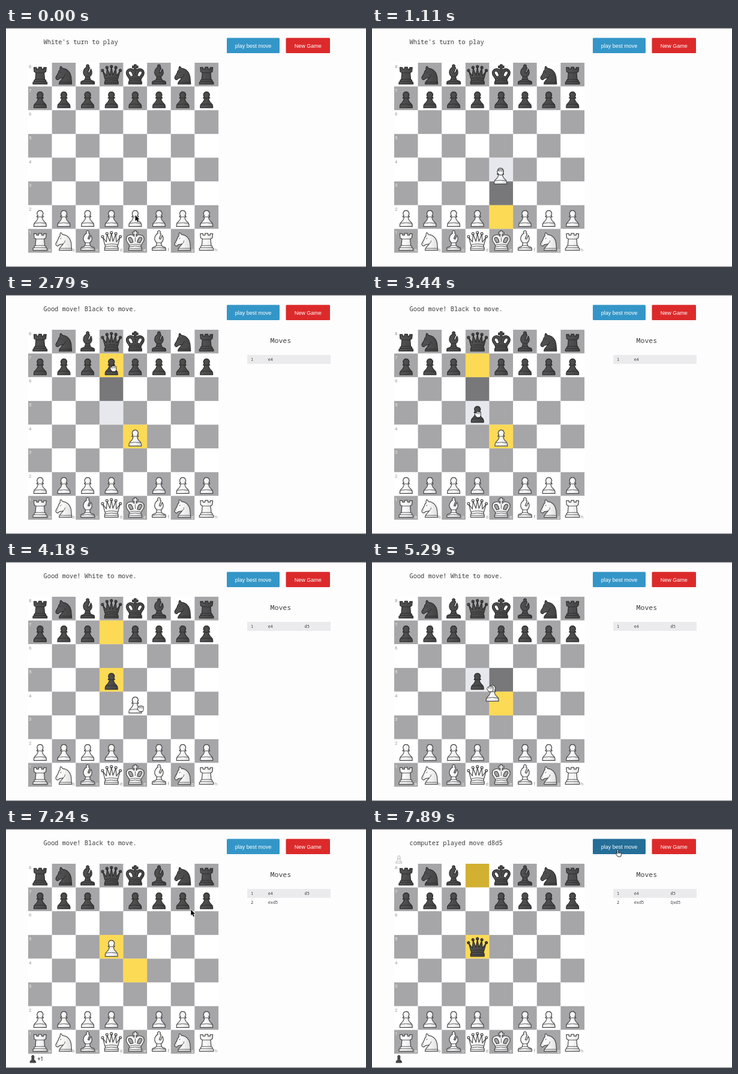
These frames come from a looping animation (600 by 399 pixels, 7990 ms). An HTML page:

```html
<!DOCTYPE html>
<html lang="en">
<head>
<meta charset="utf-8">
<title>Chess board</title>
<style>
html, body { margin: 0; width: 100%; height: 100%; overflow: hidden; background: #fefdfe; }
svg { display: block; width: 600px; height: 399px; }
.mono { font-family: "Noto Sans Mono", "DejaVu Sans Mono", monospace; fill: #3c3c3e; }
.coord { font: 7.8px Roboto, sans-serif; }
.btn { font: 9px "Liberation Sans", Arial, sans-serif; fill: #fff; text-anchor: middle; }
.w { fill: url(#ivory); stroke: #484848; }
.b { fill: url(#ebony); stroke: #2b2b2b; }
.w, .b { stroke-width: 1.2; stroke-linejoin: round; stroke-linecap: round; fill-rule: evenodd; }
.line { fill: none; stroke-width: .9; }
</style>
</head>
<body>
<svg id="stage" viewBox="0 0 600 399" xmlns="http://www.w3.org/2000/svg">
  <defs>
    <linearGradient id="ivory">
      <stop offset=".45" stop-color="#f9f9f9"/><stop offset="1" stop-color="#dedede"/>
    </linearGradient>
    <linearGradient id="ebony">
      <stop offset="0" stop-color="#555"/><stop offset="1" stop-color="#434343"/>
    </linearGradient>
  </defs>
  <rect width="600" height="399" fill="#fefdfe"/>
  <path d="M0 .5h600M0 398.5h600" stroke="#7d7d7f"/>
  <text id="status" class="mono" x="62.5" y="26.5" font-size="10.35"></text>
  <rect id="best" x="368" y="16.5" width="88" height="25.5" rx="1.5"/>
  <text class="btn" x="412" y="32.6">play best move</text>
  <rect x="466.5" y="16.5" width="73.5" height="25.5" rx="1.5" fill="#dc2a2b"/>
  <text class="btn" x="503.3" y="32.6">New Game</text>
  <g id="moves" class="mono" font-size="6.9">
    <text x="440.5" y="80" font-size="11.6">Moves</text>
    <rect x="402" y="100" width="139" height="15" fill="#ebeaec"/>
    <text x="408" y="110">1</text>
    <text x="436.7" y="110">e4</text>
    <text id="d5" x="497.5" y="110">d5</text>
    <g id="row2">
      <text x="408" y="125">2</text>
      <text x="436.7" y="125">exd5</text>
      <text id="qxd5" x="497.5" y="125">Qxd5</text>
    </g>
  </g>
  <g id="squares"></g>
  <g id="coords"></g>
  <g id="pieces"></g>
  <g id="lostBlack"></g>
  <text id="score" x="52.5" y="387.2" font-family="Roboto, sans-serif" font-weight="500" font-size="8.6" fill="#444">+1</text>
  <g id="lostWhite" opacity=".6"></g>
  <g id="cursor"></g>
</svg>
<script>
const LOOP = 7990, STEP = 92.85, LAST = 85;
const X0 = 37, Y0 = 58, SQ = 39.63;
const $ = id => document.getElementById(id);

// Each piece lives in a 40 x 40 box: outline, then inner lines.
const SHAPES = {
  p: ['M20 9a5 5 0 0 1 3.6 8.5c1.6.5 2 1.4 2 2.2h-2.2c.3 4 1.8 6.3 4.2 8.3 1.6 1.3 2.9 3 2.9 5.5v2.5h-21v-2.5c0-2.5 1.3-4.2 2.9-5.5 2.4-2 3.9-4.3 4.2-8.3h-2.2c0-.8.4-1.7 2-2.2A5 5 0 0 1 20 9z',
    'M16.6 19.7h6.8M11.5 30.5q8.5-2 17 0'],
  r: ['M9.5 8H14v2.5h3.5v-3h5v3H26V8h4.5l-.7 7-3 2 1 11 2 1.5v2l2 1.5v3H8v-3l2-1.5v-2l2-1.5 1-11-3-2z',
    'M13 17h14M12 28h16M10 31.7h20'],
  n: ['M15.5 6.5l2.5 3c8 .5 14 7 14.5 17 .2 3 .5 6 .8 9.5H12c0-5 5-7.5 7-11-3 1.5-5 1-6.5 1.5-1.5 1.5-2 2.5-3.5 2.2-2-.5-3-2.5-2.5-4 1-3 3.5-5 4.5-9 .3-2 1.5-3 2.5-4-.2-2 0-3.5.7-5.2z',
    'M14 16.5l1.6-.9M9 24.4l.5-.4M19 25c2-1.5 3-3 3-5M12.5 32.8h20'],
  b: ['M20 3a2.3 2.3 0 0 1 1.6 4l2 1.5-3.2 8 2.2.8 3-6.6c1.4 2.5 2 5 1.4 7.8-.6 2.3-2 3.8-3.5 5l1 4.5c1 2 3 2.5 5 2.8q2 .4 2 2.7V36h-23v-2.5q0-2.3 2-2.7c2-.3 4-.8 5-2.8l1-4.5c-1.5-1.2-2.9-2.7-3.5-5-1-4 .9-9 5.4-11.5A2.3 2.3 0 0 1 20 3z',
    'M16.5 23.5h7M15.5 28h9M9.5 33q10.5-3 21 0'],
  q: ['M5.5 14l6 8 1.2-13 4.8 12L20 7l2.5 14 4.8-12 1.2 13 6-8L31 27c-.8 1-1 2-.5 3l1 2v4h-23v-4l1-2c.5-1 .3-2-.5-3z'
    + [[5, 13], [12.5, 8], [20, 6.3], [27.5, 8], [35, 13]].map(([x, y]) =>
      `M${x - 2} ${y}a2 2 0 0 0 4 0a2 2 0 0 0-4 0z`).join(''),
    'M9.2 27q10.8-3.5 21.6 0M9.5 30q10.5-2.5 21 0M8.8 33h22.4'],
  k: ['M18.3 12.5v-4h-3v-3h3V3h3.4v2.5h3v3h-3v4c1.9-2 4.3-2.8 6.8-2.5 4.5.5 7 4 6.5 8-.5 4-3.5 6-5 9.5l-.3 2.5 1.3 2v4H9v-4l1.3-2-.3-2.5c-1.5-3.5-4.5-5.5-5-9.5-.5-4 2-7.5 6.5-8 2.5-.3 4.9.5 6.8 2.5zM16.5 22.5c-1-5-2.8-8.5-5.3-8.5s-3.3 2.5-2 4.8c1 1.5 2.2 2.8 2.8 4.7zM23.5 22.5c1-5 2.8-8.5 5.3-8.5s3.3 2.5 2 4.8c-1 1.5-2.2 2.8-2.8 4.7z',
    'M20 14.5v7M10 27.3q10-3 20 0M10.3 30q9.7-2.5 19.4 0M9.3 33h21.4']
};
const CURSORS = {
  arrow: '<path d="M0 0v9.7l2.2-2 1.6 3.8 1.8-.7-1.7-3.7h3z" stroke="#fff" stroke-width="1.2" paint-order="stroke"/>',
  fist: '<path d="M-4.5-1.5c0-1.5 1.8-1.7 2.2-.6 0-3 2.2-2.6 2.5-1.4.5-1.5 2.3-1 2.3.3.8-1 2.3-.4 2.3.7V1c0 2-1 2.5-1.2 4.3h-5.9c-.3-1.8-2.6-2.8-2.9-4.8-.2-1.3.5-1.8.7-2z" fill="#fff" stroke="#111" stroke-width=".9"/><path d="M-2.3-2v2.2M.2-3v3M2.5-2.8v2.8" stroke="#111" stroke-width=".7"/>',
  hand: '<path d="M-1 1c0-1.6 2-1.6 2 0v3.6l4 1c1 .3 1.2 1 1 2l-.8 4H0l-3-4.3c-.6-1 .6-1.8 1.4-1l.6.6z" fill="#fff" stroke="#111" stroke-width=".9"/><path d="M1 4.6v2.6M2.8 5.2v2" stroke="#111" stroke-width=".6"/>'
};

const glyph = (kind, side) => `<g class="${side}"><path d="${SHAPES[kind][0]}"/>`
  + `<path class="line" d="${SHAPES[kind][1]}"/></g>`;
const corner = name => [X0 + (name.charCodeAt(0) - 97) * SQ, Y0 + (8 - name[1]) * SQ];
const center = name => corner(name).map(v => v + SQ / 2);
const isDark = name => (name.charCodeAt(0) - 97 + +name[1]) % 2 === 1;

function place(el, [x, y]) {
  el.setAttribute('transform', `translate(${(x - 19.8).toFixed(2)} ${(y - 19.8).toFixed(2)}) scale(.99)`);
}
const show = (id, on) => $(id).setAttribute('visibility', on ? 'visible' : 'hidden');

const squares = {}, pieces = {};
function addPiece(name, kind, side) {
  const g = document.createElementNS('http://www.w3.org/2000/svg', 'g');
  g.innerHTML = glyph(kind, side);
  place(g, center(name));
  $('pieces').append(g);
  pieces[name] = g;
}

let board = '', coords = '';
for (let r = 8; r >= 1; r--) for (let c = 0; c < 8; c++) {
  const name = 'abcdefgh'[c] + r, [x, y] = corner(name);
  board += `<rect id="sq-${name}" x="${x}" y="${y}" width="${SQ + .05}" height="${SQ + .05}"/>`;
  const ink = isDark(name) ? '#f2f2f2' : '#979799';
  if (c === 0) coords += `<text class="coord" x="${x + 1}" y="${y + 9}" fill="${ink}">${r}</text>`;
  if (r === 1) coords += `<text class="coord" x="${x + 35.8}" y="${y + 37.2}" text-anchor="middle" fill="${ink}">${name[0]}</text>`;
}
$('squares').innerHTML = board;
$('coords').innerHTML = coords;
[...'abcdefgh'].forEach((f, i) => {
  addPiece(f + 8, 'rnbqkbnr'[i], 'b');
  addPiece(f + 7, 'p', 'b');
  addPiece(f + 2, 'p', 'w');
  addPiece(f + 1, 'rnbqkbnr'[i], 'w');
});
for (const el of $('squares').children) squares[el.id.slice(3)] = el;
for (const name of ['e2', 'd7', 'd8']) $('pieces').append(pieces[name]);
$('lostBlack').innerHTML = `<g transform="translate(35.6 373.6) scale(.46)">${glyph('p', 'b')}</g>`;
$('lostWhite').innerHTML = `<g transform="translate(35.6 40.6) scale(.46)">${glyph('p', 'w')}</g>`;

// Pointer path: time, x, y
const PATH = [
  [0, 215.5, 312.5], [460, 215.5, 314], [560, 215.5, 314], [1020, 214, 240], [1480, 214, 240],
  [2380, 179, 122.5], [2850, 179, 122.5], [3260, 176.5, 199], [3620, 176.5, 199],
  [4180, 224.5, 244.5], [4360, 219.5, 243], [5110, 219.5, 243], [5292, 197, 211.5],
  [5480, 177, 199.5], [5840, 177, 199.5], [6310, 194.8, 247], [6830, 194.8, 247], [7610, 409.5, 34.5], [7990, 409.5, 34.5]
];
function pointer(t) {
  let i = 1;
  while (i < PATH.length - 1 && PATH[i][0] < t) i++;
  const [t0, x0, y0] = PATH[i - 1], [t1, x1, y1] = PATH[i];
  const u = Math.max(0, Math.min(1, (t - t0) / (t1 - t0)));
  return [x0 + (x1 - x0) * u, y0 + (y1 - y0) * u];
}

// Board phases: start, marked squares, legal targets
const PHASES = [
  [0, [], []],
  [460, ['e2'], ['e3', 'e4']],
  [1390, ['e2', 'e4'], []],
  [2590, ['d7', 'e4'], ['d6', 'd5']],
  [3615, ['d7', 'd5'], []],
  [4640, ['e4'], ['e5', 'd5']],
  [5840, ['e4', 'd5'], []],
  [7790, ['d8', 'd5'], []]
];
const STATUS = [
  [0, "White's turn to play"], [1390, 'Good move! Black to move.'],
  [3615, 'Good move! White to move.'], [5840, 'Good move! Black to move.'],
  [7790, 'computer played move d8d5']
];
const POINTERS = [
  [0, 'arrow'], [460, 'fist'], [1480, 'arrow'], [2380, 'fist'], [3700, 'arrow'],
  [4090, 'fist'], [5930, 'arrow'], [7510, 'hand']
];
const current = (list, t) => list.filter(e => e[0] <= t).pop();
const dragged = t => pointer(t - 30);

function whitePawn(t) {
  if (t < 560) return center('e2');
  if (t < 1390) return dragged(t);
  if (t < 5150) return center('e4');
  return t < 5840 ? dragged(t) : center('d5');
}
function blackPawn(t) {
  if (t < 2850) return center('d7');
  return t < 3430 ? dragged(t) : center('d5');
}
function queen(t) {
  const u = Math.max(0, Math.min(1, (t - 7700) / 185));
  const [x, y] = center('d8');
  return [x, y + 3 * SQ * u];
}

function render(ms) {
  const t = Math.min(LAST, Math.floor((ms + 3) / STEP)) * STEP;
  const [, marked, legal] = current(PHASES, t);
  for (const name in squares) {
    const dark = isDark(name);
    squares[name].setAttribute('fill',
      marked.includes(name) ? (dark ? '#d2b032' : '#fcda55')
      : legal.includes(name) ? (dark ? '#78787a' : '#e7e8ed')
      : dark ? '#a6a5a7' : '#fff');
  }
  place(pieces.e2, whitePawn(t));
  place(pieces.d7, blackPawn(t));
  place(pieces.d8, queen(t));
  pieces.d7.setAttribute('visibility', t < 5840 ? 'visible' : 'hidden');
  pieces.e2.setAttribute('visibility', t < 7880 ? 'visible' : 'hidden');

  $('status').textContent = current(STATUS, t)[1];
  show('moves', t >= 1390);
  $('d5').style.display = t >= 3615 ? '' : 'none';
  $('row2').style.display = t >= 5840 ? '' : 'none';
  $('qxd5').style.display = t >= 7790 ? '' : 'none';
  show('lostBlack', t >= 5840);
  show('score', t >= 5840 && t < 7790);
  show('lostWhite', t >= 7790);

  const [x, y] = pointer(t);
  $('best').setAttribute('fill', x > 368 && y < 42 ? '#246e98' : '#3496c8');
  $('cursor').innerHTML = CURSORS[current(POINTERS, t)[1]];
  $('cursor').setAttribute('transform', `translate(${x.toFixed(2)} ${y.toFixed(2)})`);
}

const start = performance.now();
function tick() {
  render((performance.now() - start) % LOOP);
  requestAnimationFrame(tick);
}
tick();
</script>
</body>
</html>
```
